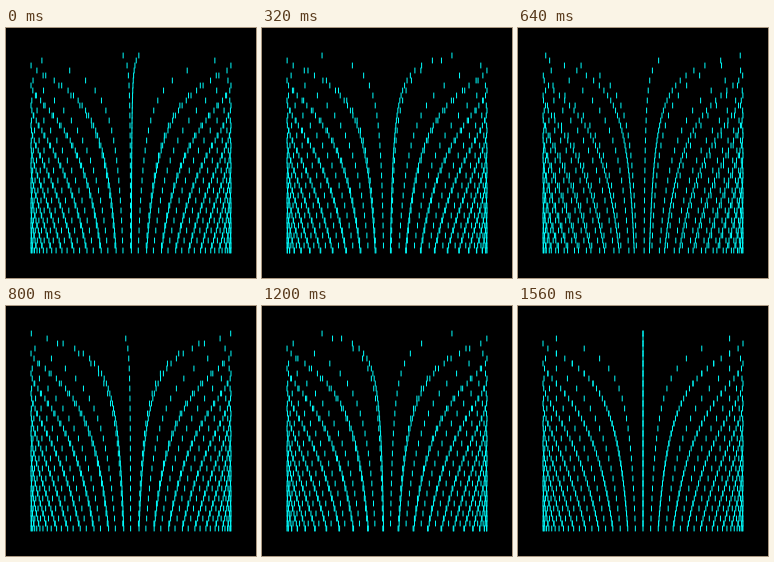
These frames come from a looping animation (250x250 px, 1600 ms). An HTML page with a canvas:

```html
<!DOCTYPE html>
<html lang="en">
<head>
<meta charset="utf-8">
<title>Turning rows</title>
<style>
  html, body { margin: 0; height: 100%; overflow: hidden; background: #000; }
  canvas { display: block; }
</style>
</head>
<body>
<canvas id="stage" width="250" height="250"></canvas>
<script>
const ctx = document.getElementById('stage').getContext('2d');
const LOOP = 1600, STEP = 40;
const CENTER = 125, RADIUS = 100, TOP = 25, ROWS = 40, ROW_HEIGHT = 5;

ctx.strokeStyle = '#0ff';
ctx.lineWidth = 1;
ctx.lineCap = 'round';

// Each row is a ring of evenly spaced ticks seen from the side;
// in one loop every ring turns by exactly one tick spacing.
function draw(turn) {
  ctx.fillRect(0, 0, 250, 250);
  for (let row = 0; row < ROWS; row++) {
    const count = row + 2;
    const y = TOP + row * ROW_HEIGHT;
    for (let i = 0; i < count; i++) {
      const x = CENTER + RADIUS * Math.sin(2 * Math.PI * (i + turn) / count);
      ctx.beginPath();
      ctx.moveTo(x, y);
      ctx.lineTo(x, y + ROW_HEIGHT);
      ctx.stroke();
    }
  }
}

const start = performance.now();
function tick() {
  const step = Math.floor((performance.now() - start) % LOOP / STEP);
  draw((step + 1) * STEP / LOOP);
  requestAnimationFrame(tick);
}
tick();
</script>
</body>
</html>
```
